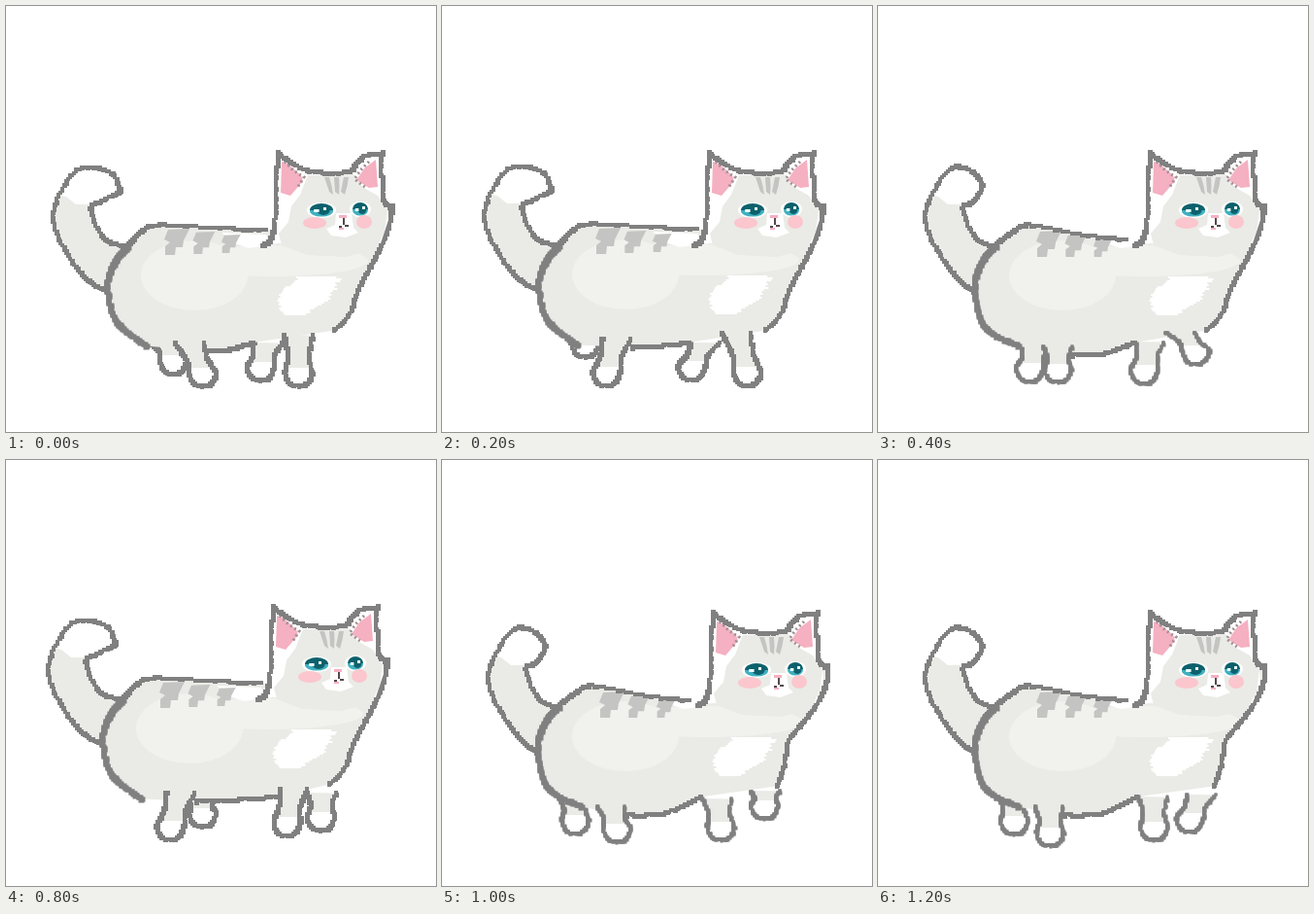
An HTML page with a canvas for the animation above (1.4 s loop, 443x438 px).

```html
<!DOCTYPE html>
<html lang="en">
<head>
<meta charset="utf-8">
<title>Walking cat</title>
<style>
  html, body { margin: 0; width: 100%; height: 100%; overflow: hidden; background: #fff; }
  canvas { display: block; }
</style>
</head>
<body>
<canvas id="stage" width="443" height="438"></canvas>
<script>
const ctx = document.getElementById('stage').getContext('2d');
const INK = '#808080', FUR = '#eaebe6', LIGHT = '#f1f2ee', WHITE = '#fff', STRIPE = '#c4c4c3';
const PINK = '#f5b0c1', BLUSH = '#fbc6cd', TEAL = '#0d616c', CYAN = '#3fb0c0', MOUTH = '#55484d';

// Legs run from hip to paw: far hind, far front, near hind, near front.
const POSES = [
  { until: 200, sway: 0, drop: 0, low: 0, legs: ['164,346 172,364', '270,346 262,371', '188,346 202,377', '301,338 301,377'] },
  { until: 400, sway: -5, drop: 0, low: 0, legs: ['147,330 147,347', '271,346 257,370', '180,342 169,376', '303,336 314,376'] },
  { until: 800, sway: 0, drop: 0, low: 1, legs: ['163,349 156,372', '280,345 274,374', '185,350 185,373', '311,335 327,354'] },
  { until: 1000, sway: -5, drop: 0, low: 0, legs: ['200,348 202,363', '325,342 324,367', '180,342 169,376', '296,338 289,372'] },
  { until: 1200, sway: -1, drop: 6, low: 1, legs: ['135,346 137,370', '333,340 332,355', '174,356 180,379', '283,348 287,377'] },
  { until: 1400, sway: 0, drop: 6, low: 1, legs: ['139,346 140,371', '333,344 321,368', '176,356 177,383', '283,346 284,377'] }
];

const parse = text => text.split(' ').map(p => p.split(',').map(Number));
const random = n => Math.abs(Math.sin(n * 127.1) * 43758) % 1;

// Catmull-Rom curve through the points; a doubled point makes a corner.
function curve(text) {
  const pts = parse(text), out = [];
  for (let i = 0; i < pts.length - 1; i++) {
    const a = pts[Math.max(0, i - 1)], b = pts[i], c = pts[i + 1], d = pts[Math.min(pts.length - 1, i + 2)];
    for (let t = 0; t <= 1; t += 0.05)
      out.push([0, 1].map(k => b[k] + 0.5 * t * (c[k] - a[k] +
        t * (2 * a[k] - 5 * b[k] + 4 * c[k] - d[k] + t * (3 * (b[k] - c[k]) + d[k] - a[k])))));
  }
  return out;
}

function trace(points) {
  ctx.beginPath();
  points.forEach(p => ctx.lineTo(...p));
}

function fill(color, points) {
  trace(points);
  ctx.fillStyle = color;
  ctx.fill();
}

const poly = (color, text) => fill(color, parse(text));

function oval(color, x, y, rx, ry, from = 0) {
  ctx.fillStyle = color;
  ctx.beginPath();
  ctx.ellipse(x, y, rx, ry, 0, from, Math.PI * 2);
  ctx.fill();
}

function box(color, ...rect) {
  ctx.fillStyle = color;
  ctx.fillRect(...rect);
}

// Square nib on a coarse grid, slightly uneven like a pixel brush.
function ink(text, size = 4) {
  curve(text).forEach(([x, y], i) => {
    const s = size + (random(i) < 0.3 ? 1 : 0);
    box(INK, Math.round(x / 2) * 2 - size / 2, Math.round(y / 2) * 2 - size / 2, s, s);
  });
}

function at(x, y, draw) {
  ctx.save();
  ctx.translate(x, y);
  draw();
  ctx.restore();
}

function twoTone(outline, top, bottom, split) {
  const shape = curve(outline);
  fill(top, shape);
  ctx.save();
  trace(shape);
  ctx.clip();
  box(bottom, 0, split, 443, 438);
  ctx.restore();
}

function drawTail(low) {
  const tip = low ? '95,169 107,184 98,201' : '107,171 117,188 117,191 98,201';
  const tail = `${104 - 6 * low},293 80,278 54,238 50,206 74,168 ${tip} 87,208 101,239 ${126 - 4 * low},247`;
  twoTone(tail, WHITE, FUR, 204);
  poly(FUR, '53,194 62,196 72,204 88,207 70,212 53,210');
  ink(tail);
}

function drawLeg(leg, thin) {
  const [[hx, hy], [fx, fy]] = parse(leg);
  const ax = hx + (fx - hx) * 0.6, ay = hy + (fy - hy) * 0.55, r = 14;
  const outline = `${hx - 15},${hy} ${ax - 11},${ay} ${fx - r},${fy} ${fx - 9},${fy + 11} ${fx},${fy + r} ` +
    `${fx + 9},${fy + 11} ${fx + r},${fy} ${ax + 11},${ay} ${hx + 15},${hy}`;
  twoTone(outline, FUR, WHITE, fy - 5);
  ink(outline, thin ? 3 : 4);
}

function drawCoat(low) {
  oval(LIGHT, 194 - 4 * low, 277, 55, 36);
  oval(LIGHT, 275, 262, 98, 16);
  poly(WHITE, `222,${233 + 5 * low} 268,235 272,246 250,249 238,245`);
  for (let i = 0; i < 3; i++) {
    ctx.save();
    ctx.translate(175 + i * 28, 229 + i * 3 + low * (2 + i));
    ctx.scale(1 - i * 0.12, 1 - i * 0.15);
    poly(STRIPE, '-8,1 14,0 8,12 7,19 0,19 -1,27 -11,27 -11,18 -6,14 -12,11');
    ctx.restore();
  }
  // Ragged white chest
  for (let i = 0; i < 20; i++) {
    const t = i / 20;
    const left = 299 - 20 * Math.sin(t * 2.5) + 5 * random(i), right = 346 - 38 * t * t - 6 * random(i + 50);
    box(WHITE, left, 278 + i * 2, right - left, 2);
  }
}

function drawEye(x, y, w) {
  oval(WHITE, x, y, w + 3, 8);
  oval(CYAN, x, y + 1, w, 5.5);
  oval(TEAL, x, y, w, 7, Math.PI);
  oval(TEAL, x + 2, y, w * 0.55, 5);
  box('#e8fbfc', x - w * 0.65, y - 1, w * 0.45, 3);
  box('#e8fbfc', x + 2, y - 3, 3, 3);
}

function drawEar(pink, edge) {
  poly(PINK, pink);
  trace(parse(edge));
  ctx.setLineDash([2, 3]);
  ctx.strokeStyle = '#a08f95';
  ctx.lineWidth = 3;
  ctx.stroke();
}

function drawFace() {
  const outline = '263,246 271,242 276,227 278,200 278,178 280,152 280,152 291,159 307,168 325,171 353,170 362,160 373,153 387,152 387,152 387,176 388,197 393,205';
  fill(WHITE, [...curve(outline), [394, 220], [386, 244], [330, 246], [280, 244]]);
  poly(FUR, '311,174 358,173 367,186 383,195 393,210 390,232 381,250 350,258 310,256 284,246 281,234 291,222 294,206 303,194');
  drawEar('284,160 290,162 304,174 306,180 293,195 283,192', '287,160 296,169 307,176 300,187');
  drawEar('381,158 383,186 374,187 361,179 369,167', '374,160 365,169 359,178 371,187');
  for (let i = 0; i < 3; i++) {
    const x = 328 + i * 10, bend = 5 - i * 4;
    poly(STRIPE, `${x},176 ${x + 5},176 ${x + 5 + bend / 2},185 ${x + 4 + bend},194 ${x + bend},191`);
  }

  poly(WHITE, '340,213 356,213 358,228 363,233 350,238 335,236 330,229 339,225');
  drawEye(325, 210, 12);
  drawEye(365, 209, 8);
  oval(BLUSH, 318, 223, 12, 6);
  oval(BLUSH, 369, 222, 8, 7);

  box(PINK, 343, 215, 8, 3);
  box(PINK, 343, 228, 5, 2);
  box(MOUTH, 347, 218, 2, 7);
  box(MOUTH, 343, 226, 3, 2);
  box(MOUTH, 349, 225, 4, 2);

  ink(outline);
  box(INK, 389, 201, 5, 6);
  box(INK, 393, 203, 8, 7);
}

function drawCat({ sway, drop, low, legs }) {
  const dy = drop ? drop + 1 : sway / 5;
  const rear = 5 * low, sag = 9 * low;
  const [hind, front] = [parse(legs[2])[0], Math.min(...[1, 3].map(i => parse(legs[i])[0][0]))];
  const belly = `${hind[0] + 15},${hind[1] + 9} ${(hind[0] + front) / 2},${hind[1] + 7} ${front - 16},346`;
  const side = `${126 - rear},247 ${114 - rear},260 ${106 - rear},278 ${105 - rear},296 ${111 - rear},${320 + 3 * low} ${124 - rear},${335 + 3 * low} 146,350`;
  const back = `${114 - rear},258 ${126 - rear},245 140,231 157,225 ${215 - rear},${228 + sag * 0.8} ${270 - 13 * low},${231 + sag}`;
  const chest = drop ? '398,215 396,232 386,252 371,272 357,290 354,312 346,336'
    : '398,208 393,228 386,248 373,272 361,296 354,316 338,334';
  const shift = (text, x, y) => curve(text).map(p => [p[0] + x, p[1] + y]);

  ctx.clearRect(0, 0, 443, 438);
  at(sway, dy, () => drawTail(low));
  legs.slice(0, 2).forEach(leg => drawLeg(leg, low));
  fill(FUR, [
    ...shift(back, sway, dy), ...shift(chest, sway, 0),
    ...curve(belly).reverse(), ...shift(side, sway, dy).reverse()
  ]);
  at(sway, dy, () => {
    drawCoat(low);
    ink(side, 5);
    ink(back);
  });
  at(sway, 0, () => ink(chest));
  ink(belly);
  legs.slice(2).forEach(leg => drawLeg(leg, low));
  at(sway, drop, drawFace);
}

const start = performance.now();
function tick() {
  const time = (performance.now() - start) % 1400;
  drawCat(POSES.find(pose => time < pose.until));
  requestAnimationFrame(tick);
}
tick();
</script>
</body>
</html>
```
